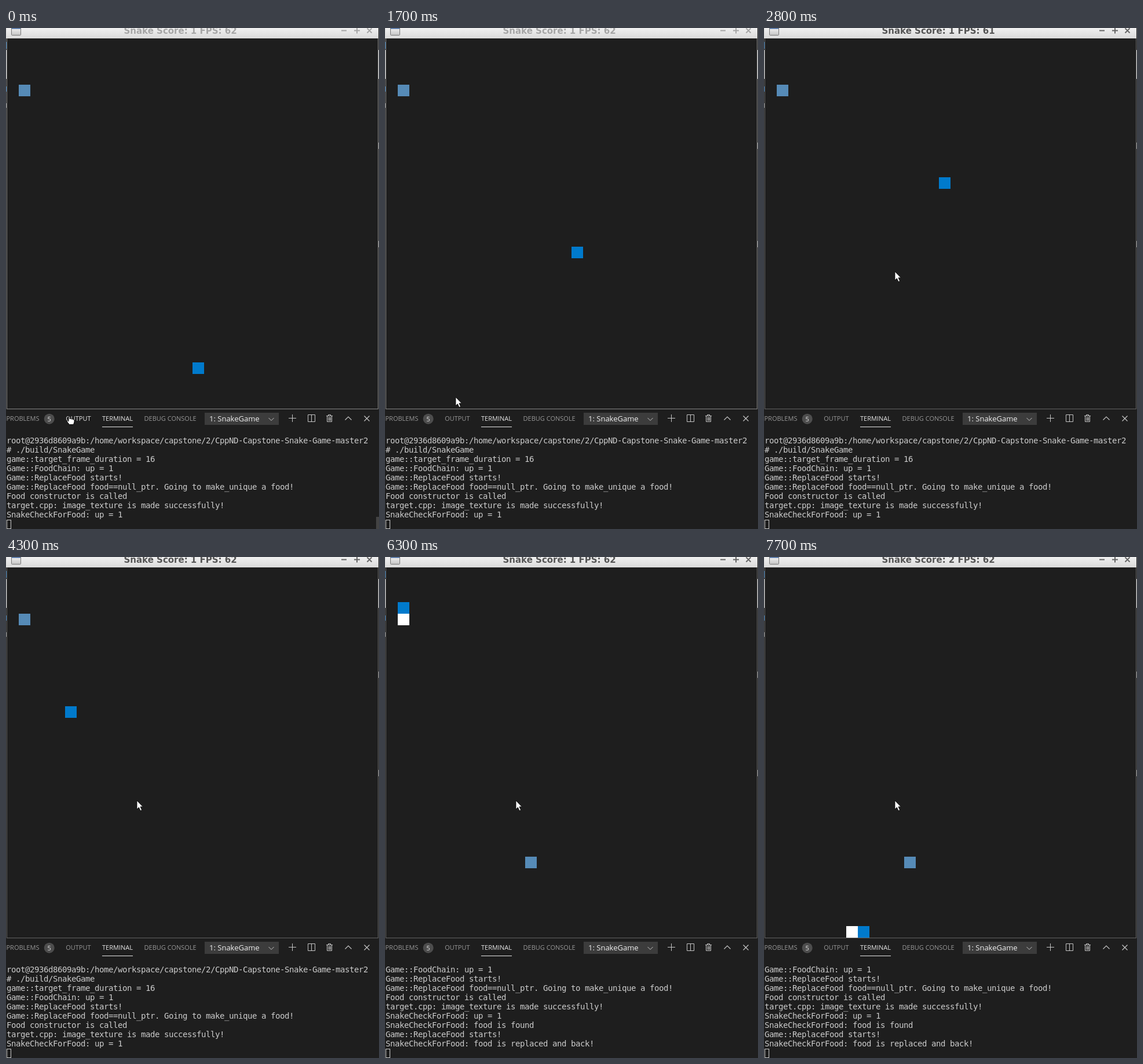
An HTML page for the animation above (8000 ms loop, 644x866 px).

```html
<!DOCTYPE html>
<html lang="en">
<head>
<meta charset="utf-8">
<title>Snake</title>
<style>
  html, body { margin: 0; width: 100%; height: 100%; overflow: hidden; background: #1e1e1e; }
  svg { display: block; width: 644px; height: 866px; }
  text { white-space: pre; }
  .title { font: bold 15px "DejaVu Sans", sans-serif; }
  .tab { font: 11px "Open Sans", sans-serif; fill: #979797; }
  .on { fill: #e7e7e7; }
  .pick { font: 13px "Open Sans", sans-serif; fill: #f0f0f0; }
  .tip { font: 14.67px "Open Sans", sans-serif; fill: #fff; }
  /* terminal cells are 8px wide */
  .term { font: 14px "DejaVu Sans Mono", monospace; letter-spacing: -0.43px; fill: #ccc; }
  .icon { fill: none; stroke: #c5c5c5; }
  .sharp { shape-rendering: crispEdges; }
</style>
</head>
<body>
<svg viewBox="0 0 644 866">
  <defs>
    <linearGradient id="bar" x2="0" y2="1">
      <stop offset="0" stop-color="#f0f0f0"/><stop offset="1" stop-color="#dadada"/>
    </linearGradient>
    <linearGradient id="pane" x2="0" y2="1">
      <stop offset="0" stop-color="#fff"/><stop offset="1" stop-color="#c4c4c4"/>
    </linearGradient>
  </defs>
  <rect width="644" height="866" fill="#1e1e1e"/>

  <!-- slivers of the window behind -->
  <g class="sharp">
    <path d="M0 0h1v18h-1zM0 38h1v50h-1zM643 38h1v50h-1z" fill="#d8d8d8"/>
    <path d="M0 24h1v12h-1zM0 101h1v9h-1z" fill="#2f6fa8"/>
    <path d="M0 130h1v8h-1zM643 198h1v11h-1zM643 368h1v11h-1z" fill="#8a8a8a"/>
  </g>

  <!-- game window -->
  <rect id="frame" x="1.5" y="-5.5" width="641" height="664" fill="#1e1e1e"/>
  <rect x="1" width="642" height="18" fill="url(#bar)"/>
  <rect x="9.5" y="-3.5" width="16" height="16" rx="1" fill="url(#pane)" stroke="#757575"/>
  <path d="M10 0.5h15" stroke="#3f66a0" stroke-width="2"/>
  <text id="title" class="title" x="203.5" y="10"></text>
  <path id="buttons" d="M579 4.5h9M601 4.5h10M606 -.5v10M623.5 .5l8 8M631.5 .5l-8 8" fill="none" stroke-width="2"/>
  <g class="sharp">
    <rect id="food" width="20" height="20" fill="#568bb7"/>
    <rect id="body" width="20" height="20" fill="#fff"/>
    <rect id="head" width="20" height="20" fill="#007acc"/>
  </g>

  <!-- panel header -->
  <text class="tab" x="0.5" y="679">PROBLEMS</text>
  <circle cx="74.7" cy="675.7" r="9" fill="#4d4d4d"/>
  <text class="tab on" x="74.7" y="679.5" text-anchor="middle">5</text>
  <text id="output" class="tab" x="103.2" y="679">OUTPUT</text>
  <text class="tab on" x="166" y="679">TERMINAL</text>
  <rect x="166" y="689" width="53" height="1" fill="#e7e7e7"/>
  <text class="tab" x="238.6" y="679">DEBUG CONSOLE</text>
  <rect x="343" y="665" width="128" height="21" fill="#3c3c3c"/>
  <text class="pick" x="351" y="680">1: SnakeGame</text>
  <g class="icon">
    <path d="M453.5 674l4.5 4.5l4.5 -4.5"/>
    <path d="M488 674.5h13M494.5 668v13"/>
    <path d="M521.5 668.5h12v12h-12zM527.5 668.5v12"/>
    <path d="M553 670.5h11M556.5 670v-1.5h4v1.5M554.5 671v9.5h8v-9.5M557 672.5v6.5M558.8 672.5v6.5M560.5 672.5v6.5"/>
    <path d="M585.5 677.5l5.5 -5.5l5.5 5.5" stroke-width="1.2"/>
    <path d="M618.5 670.5l9 9M627.5 670.5l-9 9" stroke-width="1.2"/>
  </g>

  <g id="term" class="term"></g>
  <rect x="1.5" y="850.5" width="7" height="15" fill="none" stroke="#ccc"/>
  <rect id="scroll" x="639" y="845" width="5" height="21" fill="#434343"/>

  <g id="tip">
    <rect x="111.5" y="687.5" width="168" height="25" fill="#505050" stroke="#fff"/>
    <text class="tip" x="118.5" y="705">Output (Ctrl+K Ctrl+H)</text>
  </g>
  <path id="hand" fill="#fff" stroke="#000" stroke-linejoin="round"
    d="M4 8V1.5Q5 0 6 1.5V5.5Q8 4.5 9 6Q11 5.3 11.5 6.7Q13.5 6.2 14 8V11L12.5 15.5H5.5L1 10Q1 7.5 4 10Z"/>
  <path id="arrow" d="M0 0V15L3.4 11.8L6 17.6L8.6 16.4L6 10.8H10.4Z" fill="#fff" stroke="#000" stroke-width=".8"/>
</svg>
<script>
const LOOP = 8000;
const $ = id => document.getElementById(id);

// [time, value...] rows; each holds until the next
const head = [
  [0, 322, 578], [600, 322, 498], [900, 322, 478], [1000, 322, 458],
  [1200, 322, 438], [1300, 322, 418], [1500, 322, 398], [1700, 322, 378],
  [1800, 322, 358], [2000, 322, 338], [2200, 322, 318], [2300, 322, 298],
  [2500, 322, 278], [2600, 322, 258], [2800, 302, 258], [2900, 282, 258],
  [4300, 102, 258], [4600, 62, 258], [4900, 22, 258], [5100, 22, 218],
  [5400, 22, 198], [5700, 22, 158], [6300, 22, 78], [6600, 22, 38],
  [6900, 42, 638], [7200, 82, 638], [7700, 162, 638]
];
const pointer = [
  [0, "hand", 104, 670], [600, "hand", 97, 669], [1700, "arrow", 122, 638],
  [1800, "arrow", 164, 556], [1900, "arrow", 203, 474], [2000, "arrow", 226, 421]
];
const fps = [[0, 62], [2600, 61], [4300, 62]];

const log = [
  "root@2936d8609a9b:/home/workspace/capstone/2/CppND-Capstone-Snake-Game-master2",
  "# ./build/SnakeGame",
  "game::target_frame_duration = 16",
  "Game::FoodChain: up = 1",
  "Game::ReplaceFood starts!",
  "Game::ReplaceFood food==null_ptr. Going to make_unique a food!",
  "Food constructor is called",
  "target.cpp: image_texture is made successfully!",
  "SnakeCheckForFood: up = 1",
  "SnakeCheckForFood: food is found",
  "Game::ReplaceFood starts!",
  "SnakeCheckForFood: food is replaced and back!"
];
const ROWS = 9;
const rows = Array.from({ length: ROWS }, (_, i) => {
  const row = document.createElementNS("http://www.w3.org/2000/svg", "text");
  row.setAttribute("x", 1);
  row.setAttribute("y", 718 + 16 * i);
  return $("term").appendChild(row);
});

const at = (steps, t) => steps.findLast(s => s[0] <= t).slice(1);
const move = (id, x, y) => $(id).setAttribute("transform", `translate(${x} ${y})`);
const show = (id, on) => $(id).setAttribute("visibility", on ? "visible" : "hidden");
const write = (el, s) => { if (el.textContent !== s) el.textContent = s; };

function draw(t) {
  const eaten = t >= 6300;
  const focused = t >= 2100;
  const [x, y] = at(head, t);

  move("head", x, y);
  show("body", eaten);
  if (t < 6900) move("body", x, y + 20);
  else move("body", x - 20, y);
  move("food", eaten ? 242 : 22, eaten ? 518 : 98);

  write($("title"), `Snake Score: ${t < 6600 ? 1 : 2} FPS: ${at(fps, t)[0]}`);
  $("title").setAttribute("fill", focused ? "#555" : "#a6a6a6");
  $("buttons").setAttribute("stroke", focused ? "#666" : "#a6a6a6");
  $("frame").setAttribute("stroke", focused ? "#626262" : "#868686");

  const [kind, px, py] = at(pointer, t);
  show("hand", kind === "hand");
  show("arrow", kind === "arrow");
  move(kind, px, py);
  $("output").classList.toggle("on", kind === "hand");
  show("tip", t >= 600 && t < 1700);
  show("scroll", t < 600);

  const first = eaten ? log.length - ROWS : 0;
  rows.forEach((row, i) => write(row, log[first + i]));
}

const start = performance.now();
function tick() {
  draw((performance.now() - start) % LOOP);
  requestAnimationFrame(tick);
}
tick();
</script>
</body>
</html>
```
